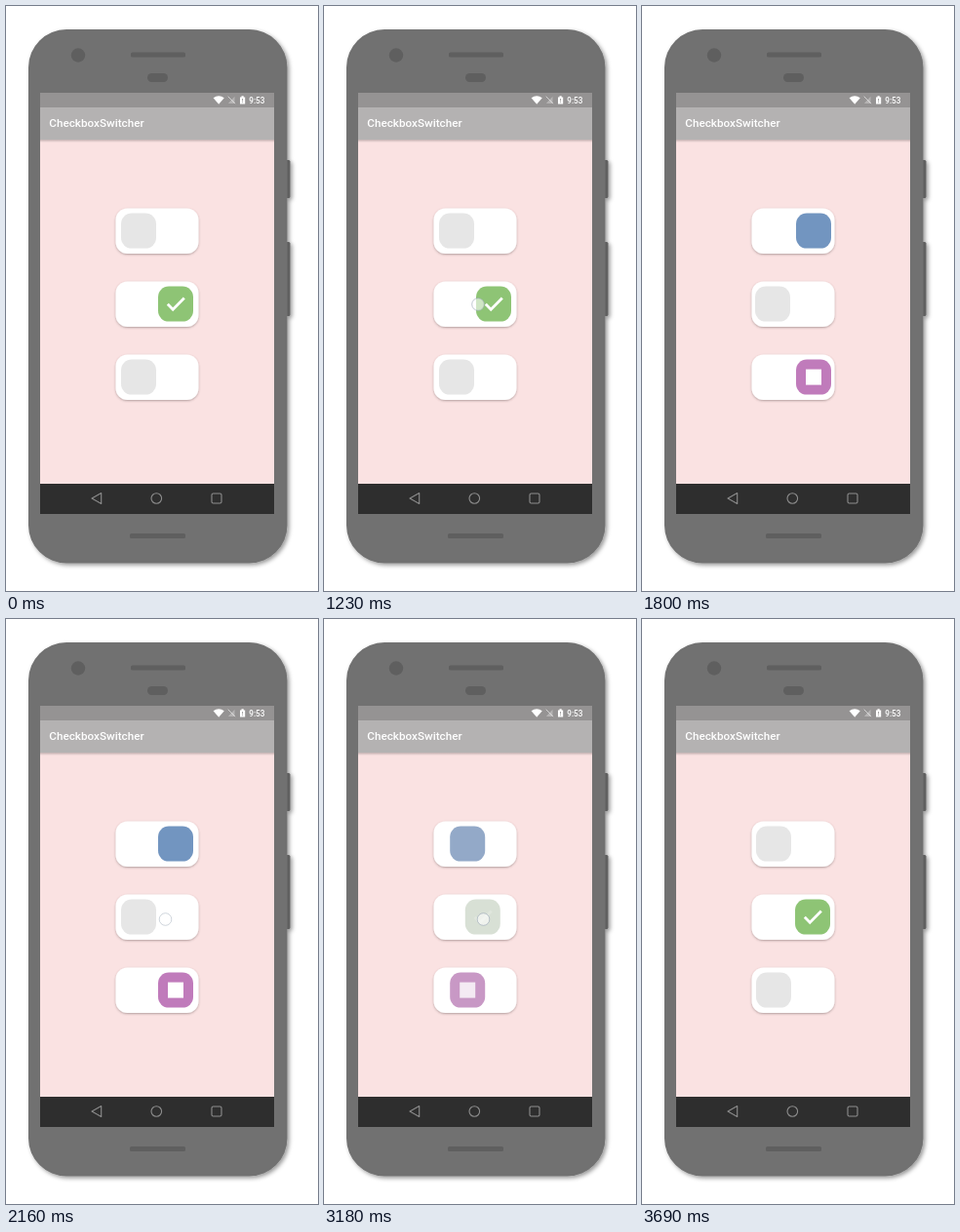
An HTML page for the animation above (3720 ms loop, 320 px wide and 600 px high).

```html
<!DOCTYPE html>
<html lang="en">
<head>
<meta charset="utf-8">
<title>CheckboxSwitcher</title>
<style>
  html, body { margin: 0; width: 100%; height: 100%; overflow: hidden; background: #fff; }
  svg { display: block; width: 320px; height: 600px; }
  text { font-family: Roboto, sans-serif; font-weight: 500; fill: #fff; }
</style>
</head>
<body>
<svg viewBox="0 0 320 600">
  <defs>
    <filter id="bodyShadow" x="-10%" y="-10%" width="120%" height="120%">
      <feDropShadow dx="2" dy="2" stdDeviation="2" flood-color="#000" flood-opacity=".4"/>
    </filter>
    <filter id="cardShadow" x="-10%" y="-15%" width="120%" height="135%">
      <feDropShadow dx="0" dy="1" stdDeviation="1" flood-color="#503c3c" flood-opacity=".42"/>
    </filter>
    <linearGradient id="barShadow" x1="0" y1="0" x2="0" y2="1">
      <stop offset="0" stop-color="#000" stop-opacity=".22"/>
      <stop offset="1" stop-color="#000" stop-opacity="0"/>
    </linearGradient>
  </defs>

  <g filter="url(#bodyShadow)">
    <rect x="285" y="158" width="6.5" height="39" rx="1.5" fill="#606060"/>
    <rect x="285" y="242" width="6.5" height="76" rx="1.5" fill="#606060"/>
    <rect x="23" y="24" width="265.5" height="547.5" rx="39" fill="#717171"/>
  </g>
  <g fill="#5f5f5f">
    <circle cx="74" cy="50.5" r="7.2"/>
    <rect x="128" y="47.5" width="56" height="5" rx="1.5"/>
    <rect x="145" y="69" width="21" height="9" rx="4.5"/>
    <rect x="127" y="541" width="57" height="5" rx="1.5"/>
  </g>

  <rect x="35" y="89" width="240" height="432" fill="#fae2e2"/>
  <rect x="35" y="89" width="240" height="15" fill="#959393"/>
  <rect x="35" y="104" width="240" height="33" fill="#b4b2b2"/>
  <rect x="35" y="137" width="240" height="3" fill="url(#barShadow)"/>
  <rect x="35" y="490" width="240" height="31" fill="#2e2e2e"/>

  <text x="44.3" y="124.2" font-size="11.7">CheckboxSwitcher</text>
  <text x="249.3" y="99.7" font-size="8.2">9:53</text>
  <path d="M212.6 94.3Q218.2 90.3 223.8 94.3L218.2 100.8Z" fill="#fff"/>
  <path d="M234.5 92.8V100H227.8Z" fill="#fff" opacity=".3"/>
  <path d="M227.7 92.7L235 100.2" stroke="#fff" stroke-width=".9" opacity=".65"/>
  <path d="M240 93.4H241.5V92.3H243.7V93.4H245.2V100.6H240Z" fill="#fff"/>
  <path d="M242.6 95V97.5M242.6 98.3V99.2" stroke="#959393" stroke-width=".9"/>

  <g fill="none" stroke="#8d8d8d" stroke-width="1.1" stroke-linejoin="round">
    <path d="M88 505L97.7 499.6V510.4Z"/>
    <circle cx="154.3" cy="505" r="5.3"/>
    <rect x="211" y="500" width="10" height="10" rx="1.5"/>
  </g>

  <g id="switches"></g>
  <circle id="touch" r="6.3" fill="#fff" fill-opacity=".58" stroke="#9eabb8" stroke-opacity=".65" stroke-width="1"/>
</svg>

<script>
const LOOP = 3720, OFF_X = 118, ON_X = 156;
const GRAY = [230, 230, 230];
const flips = [{ start: 1285, dur: 660 }, { start: 3026, dur: 776 }];
const COLOR_DUR = 520;

const check = { tag: 'path', d: 'M9.8 18.2L15.2 23.6L26.8 12', fill: 'none', stroke: '#fff', 'stroke-width': 2.8 };
const block = { tag: 'rect', x: 10, y: 10, width: 16, height: 16, fill: '#fff' };
const rows = [
  { y: 207, color: [114, 149, 192], on: false },
  { y: 282, color: [142, 196, 117], on: true, icon: check },
  { y: 357, color: [192, 123, 187], on: false, icon: block }
];

// time, x, y, opacity
const touchSteps = [
  [60, 157.2, 314, 0], [300, 157.3, 313.8, 1], [570, 157.8, 312.6, 1],
  [720, 158, 306, 1], [1350, 158, 306, 1], [1410, 159.5, 305.5, 0.6],
  [1470, 160, 305, 0.3], [1590, 160, 305, 0], [1980, 163.5, 308, 0],
  [2220, 163.5, 308, 1], [3210, 163.5, 308, 1], [3420, 163.5, 308, 0]
];

function add(parent, { tag, ...attrs }) {
  const el = document.createElementNS('http://www.w3.org/2000/svg', tag);
  for (const k in attrs) el.setAttribute(k, attrs[k]);
  return parent.appendChild(el);
}

const root = document.getElementById('switches');
const touch = document.getElementById('touch');
for (const r of rows) {
  add(root, { tag: 'rect', x: 112.5, y: r.y + 0.5, width: 85, height: 46.5, rx: 12, fill: '#fff', filter: 'url(#cardShadow)' });
  r.thumb = add(root, { tag: 'g' });
  r.face = add(r.thumb, { tag: 'rect', width: 36, height: 36, rx: 11 });
  if (r.icon) r.mark = add(r.thumb, r.icon);
}

const clamp = v => Math.min(1, Math.max(0, v));
const smooth = t => (1 - Math.cos(Math.PI * t)) / 2;
const overshoot = t => { const u = t - 1; return 1 + u * u * (2.7 * u + 1.7); };

// Colours blend in linear light
const mix = (a, b, k) => a.map((v, i) =>
  Math.round(((1 - k) * v ** 2.2 + k * b[i] ** 2.2) ** (1 / 2.2)));

function touchAt(t) {
  const i = touchSteps.findIndex(s => s[0] > t);
  if (i < 1) return touchSteps[i < 0 ? touchSteps.length - 1 : 0];
  const a = touchSteps[i - 1], b = touchSteps[i];
  const k = (t - a[0]) / (b[0] - a[0]);
  return a.map((v, j) => v + (b[j] - v) * k);
}

function draw(t) {
  const [go, back] = flips;
  const active = t < back.start ? go : back;
  const move = overshoot(clamp((t - active.start) / active.dur));
  const tint = smooth(clamp((t - active.start) / COLOR_DUR));
  for (const r of rows) {
    const toOn = r.on === (active === back);
    const pos = toOn ? move : 1 - move;
    const k = toOn ? tint : 1 - tint;
    const x = OFF_X + (ON_X - OFF_X) * pos;
    r.thumb.setAttribute('transform', `translate(${x.toFixed(2)} ${r.y + 5.6})`);
    r.face.setAttribute('fill', `rgb(${mix(GRAY, r.color, k)})`);
    if (r.mark) r.mark.setAttribute('opacity', k);
  }
  const [, cx, cy, alpha] = touchAt(t);
  touch.setAttribute('cx', cx);
  touch.setAttribute('cy', cy);
  touch.setAttribute('opacity', alpha);
}

const begin = performance.now();
function tick() {
  draw((performance.now() - begin) % LOOP);
  requestAnimationFrame(tick);
}
tick();
</script>
</body>
</html>
```
